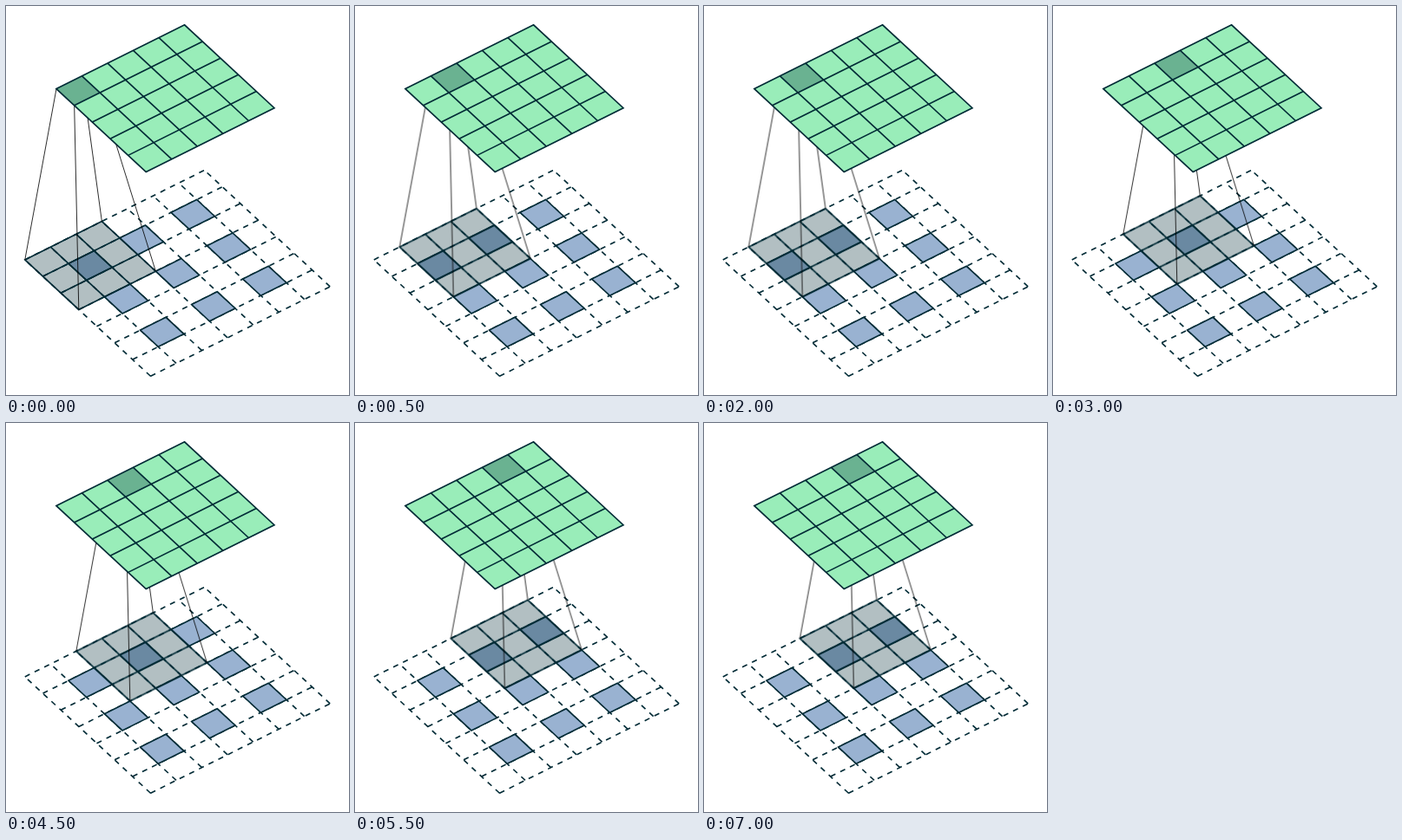
Animation of 395x449 px, one loop 8 s. Source, as an HTML page:

```html
<!DOCTYPE html>
<html lang="en">
<head>
<meta charset="utf-8">
<title>Sliding window</title>
<style>
  html, body { margin: 0; width: 100%; height: 100%; overflow: hidden; background: #fff; }
  svg { display: block; width: 395px; height: 449px; }
  path { fill: none; stroke: none; }
  .line { stroke: #002b36; stroke-width: 1.66; }
  .dash { stroke-dasharray: 6.23; }
  .thin { stroke: #000; stroke-width: .83; }
  .blue { fill: #99b2d1; }
  .green { fill: #99edb9; }
  .shade { fill: #002b36; fill-opacity: .3; }
</style>
</head>
<body>
<svg id="stage" viewBox="0 0 395 449"></svg>
<script>
const S = 29.526;
const DURATION = 8000;
const STARTS = [0, 500, 3000, 5500];

const stage = document.getElementById('stage');

// Isometric plane: a runs up-right, b runs down-right from the left corner.
const plane = (x, y) => (a, b) =>
  `${(x + S * (a + .7 * b)).toFixed(2)} ${(y + S * (.65 * b - .5 * a)).toFixed(2)}`;

const floor = plane(21.8, 292.9);
const roof = plane(58, 95.6);

const el = (name, parent) =>
  parent.appendChild(document.createElementNS('http://www.w3.org/2000/svg', name));

function path(parent, cls, d) {
  const p = el('path', parent);
  p.setAttribute('class', cls);
  p.setAttribute('d', d);
}

const quad = (at, a, b, n) =>
  `M${at(a, b)}L${at(a + n, b)}L${at(a + n, b + n)}L${at(a, b + n)}Z`;

function grid(at, n) {
  let d = '';
  for (let i = 0; i <= n; i++) {
    d += `M${at(0, i)}L${at(n, i)}M${at(i, n)}L${at(i, 0)}`;
  }
  return d;
}

// A group that jumps one cell along a at each start time.
function slider() {
  const g = el('g', stage);
  const frames = STARTS.map((t, i) => ({
    offset: t / DURATION,
    transform: `translate(${i * S}px, ${-i * S / 2}px)`,
    easing: 'steps(1, end)'
  }));
  frames.push({ ...frames[frames.length - 1], offset: 1 });
  g.animate(frames, { duration: DURATION, iterations: Infinity });
  return g;
}

path(stage, 'line dash', grid(floor, 7));
for (const a of [1, 3, 5]) {
  for (const b of [1, 3, 5]) path(stage, 'line blue', quad(floor, a, b, 1));
}

const win = slider();
path(win, 'shade', quad(floor, 0, 0, 3));
path(win, 'line', grid(floor, 3) + quad(floor, 0, 0, 3));
for (const [a, b] of [[0, 0], [1, 0], [1, 1], [0, 1]]) {
  path(win, 'thin', `M${floor(3 * a, 3 * b)}L${roof(a, b)}`);
}

path(stage, 'green', quad(roof, 0, 0, 5));
path(slider(), 'shade', quad(roof, 0, 0, 1));
path(stage, 'line', grid(roof, 5) + quad(roof, 0, 0, 5));
</script>
</body>
</html>
```
